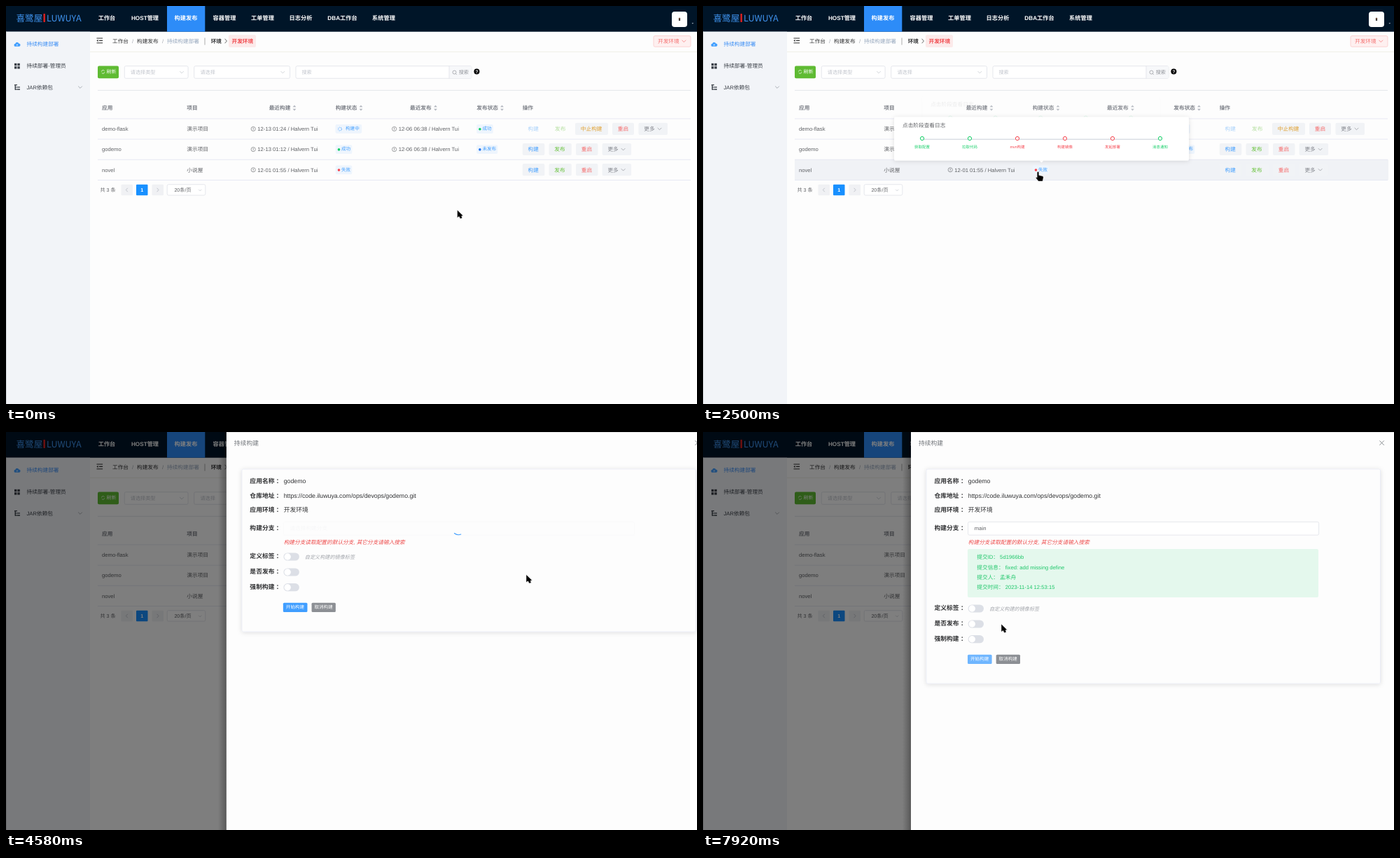
An HTML page for the animation above (8000 ms loop, 987 px wide and 568 px high).

```html
<!DOCTYPE html>
<html lang="zh-CN">
<head>
<meta charset="utf-8">
<title>持续构建部署</title>
<style>
html, body { margin: 0; width: 100%; height: 100%; overflow: hidden; background: #fdfdfd; }
svg { display: block; width: 987px; height: 568px; }
text { font-family: "Liberation Sans", "Noto Sans CJK SC", "Noto Sans CJK", sans-serif; white-space: pre; text-rendering: geometricPrecision; }
.b { font-weight: bold; }
.i { font-style: italic; }
.m { text-anchor: middle; }
.logo { font-family: "Noto Sans CJK SC", "Noto Sans CJK", sans-serif; font-weight: 300; }
</style>
</head>
<body>
<svg id="stage" viewBox="0 0 987 568"></svg>
<script>
const BLUE = '#409eff', GREEN = '#67c23a', RED = '#f56c6c', GREY = '#606266';
const LINE = '#e2e5f1', PALE = '#f1f3f6', HINT = '#c0c4cc', OK = '#13ce66', BAD = '#f5454f';

// Text is placed by its left edge (or middle) and its vertical centre.
const text = (x, y, s, fill, size = 7.68, cls = '') =>
  `<text x="${x}" y="${y + size * .36}" font-size="${size}" fill="${fill}" class="${cls}">${s}</text>`;
const rect = (x, y, w, h, fill, more = '') =>
  `<rect x="${x}" y="${y}" width="${w}" height="${h}" fill="${fill}" ${more}/>`;
const path = (d, stroke, w = .8, fill = 'none') =>
  `<path d="${d}" stroke="${stroke}" stroke-width="${w}" fill="${fill}"/>`;
const dot = (x, y, r, fill, more = '') => `<circle cx="${x}" cy="${y}" r="${r}" fill="${fill}" ${more}/>`;
const group = (id, body, more = '') => `<g id="${id}" ${more}>${body}</g>`;
const hline = (x1, x2, y, c = LINE, w = .8) => path(`M${x1} ${y}H${x2}`, c, w);
const down = (x, y, c) => path(`M${x - 2.8} ${y - 1.3}l2.8 2.8l2.8 -2.8`, c, .7);
const box = (x, y, w, h) => rect(x, y, w, h, '#fff', 'rx="2" stroke="#dcdfe6" stroke-width=".7"');

function topBar() {
  const items = [['工作台', 144], ['HOST管理', 198.5], ['构建发布', 257], ['容器管理', 312],
    ['工单管理', 366.5], ['日志分析', 421], ['DBA工作台', 480.5], ['系统管理', 539.5]];
  return rect(0, 0, 987, 36.7, '#001528') + rect(230, 0, 54.3, 36.7, '#2d8cf8') +
    text(14.5, 17.2, '喜鹭屋', '#3f93ee', 12.6, 'logo') + rect(53.5, 11, 2.4, 12, '#e02020') +
    text(58, 17.2, 'LUWUYA', '#3f93ee', 12.6, 'logo') +
    items.map(([s, x]) => text(x, 17, s, '#fff', 8.2, 'b m')).join('') +
    rect(951, 8, 22, 22, '#fff', 'rx="4"') + dot(962, 18, 1.3, '#6b4a3a') + rect(960.9, 19, 2.2, 2, '#333') +
    path('M979.5 24h2.6l-1.3 1.8z', 'none', 0, '#9aa5b1');
}

function sideBar() {
  const d = '#3a3f47';
  const cells = [[12, 81.8], [16.4, 81.8], [12, 86.2], [16.4, 86.2]];
  return rect(0, 36.7, 120, 532, '#f2f4f8') + path('M.4 36.7V568', '#c4c8cc', .8) +
    path('M13.6 57.8a2 2 0 0 1 -.2 -4a2.6 2.6 0 0 1 4.9 -.4a2.2 2.2 0 0 1 .1 4.4z', 'none', 0, BLUE) +
    path('M15.9 57.2v-2.6m-1.1 1.1l1.1 -1.1l1.1 1.1', '#fff', .6) +
    text(29.5, 54.5, '持续构建部署', '#3d8ff5') +
    cells.map(([x, y]) => rect(x, y, 3.4, 3.4, d)).join('') +
    text(29.5, 85.5, '持续部署-管理员', d) +
    path('M12 112.6h4M13.2 112.6v6.4h2.4M13.2 115.8h2.4M16 115.8h4M16 119h4', d, 1.3) +
    text(29.5, 116, 'JAR依赖包', d) + down(106, 115.8, '#8a9099');
}

function crumbs() {
  return path('M129.5 46h8.6M133 49.4h5.1M129.5 52.8h8.6', '#333', 1.1) +
    path('M131.6 47.8v3.2l-2.2 -1.6z', 'none', 0, '#333') +
    text(152, 50, '工作台', '#303133') + text(180, 50, '/', '#a0a4ac') +
    text(187, 50, '构建发布', '#303133') + text(223, 50, '/', '#a0a4ac') +
    text(230, 50, '持续构建部署', '#97a8be') + path('M284 45.5v10', '#888', .7) +
    text(292.7, 50, '环境', '#303133', 7.68, 'b') + path('M312.6 46.8l2.8 3.2l-2.8 3.2', '#444', .8) +
    rect(318, 41.3, 39, 17.7, '#fceaea', 'rx="2"') + text(322.5, 50, '开发环境', '#f0484c', 7.68, 'b') +
    rect(925, 42.6, 53, 15.6, '#fef0f0', 'rx="2" stroke="#fbc4c4" stroke-width=".7"') +
    text(931, 50.3, '开发环境', RED) + down(968.3, 50, RED) + hline(120, 987, 65.4, '#ecece4');
}

function filters() {
  return rect(131, 85.5, 30, 17.8, '#5fbb33', 'rx="2"') +
    path('M136.4 93.6a2.3 2.3 0 0 1 4.2 -1M140.9 94.3a2.3 2.3 0 0 1 -4.2 1', '#fff', .7) +
    text(143.5, 93.6, '刷新', '#fff', 6.9) +
    box(169.3, 85.7, 90.8, 17.6) + text(177.8, 94.6, '请选择类型', HINT, 7.13) + down(251, 94.4, HINT) +
    box(268.7, 85.7, 136.8, 17.6) + text(277.5, 94.6, '请选择', HINT, 7.13) + down(395.3, 94.4, HINT) +
    box(414, 85.7, 251, 17.6) + text(422.5, 94.6, '搜索', HINT, 7.13) +
    rect(633, 86, 31.7, 17, '#f7f8fa') + path('M633 85.7v17.6', '#dcdfe6', .7) +
    dot(640.5, 94.6, 2.5, 'none', 'stroke="#909399" stroke-width=".7"') + path('M642.3 96.5l1.6 1.6', '#909399', .7) +
    text(646.7, 94.6, '搜索', '#909399', 7.13) +
    dot(672.4, 93.6, 4, '#000') + text(672.4, 93.7, '?', '#fff', 6.5, 'b m') + hline(131, 978, 120.4, '#dfe1e8');
}

function tag(x, y, s, color) {
  const w = 10.4 + s.length * 6.58;
  return rect(x, y - 6.3, w, 12.8, '#eef5fd', 'rx="2"') + dot(x + 4.7, y + .3, 1.8, color) + text(x + 8.2, y - .5, s, BLUE, 6.58);
}
const button = (x, w, y, s, c, bg = PALE) => rect(x, y - 8.7, w, 17.2, bg, 'rx="2"') + text(x + 7.8, y, s, c);
const more = (x, y) => button(x, 41.5, y, '更多', '#85888f') + down(x + 30, y - .2, '#909399');
const stamp = (x, y, s) => dot(x, y, 3.1, 'none', `stroke="${GREY}" stroke-width=".6"`) +
  path(`M${x} ${y - 1.8}v2.2M${x} ${y + 1}v.8`, GREY, .7) + text(x + 6.1, y, s + ' / Halvern Tui', GREY);

function table() {
  const head = [['应用', 137], ['项目', 258.3], ['最近构建', 375.7, 412], ['构建状态', 470.7, 507],
    ['最近发布', 577, 613.5], ['发布状态', 672.3, 708.5], ['操作', 737.7]];
  const rows = [['demo-flask', '演示项目', '12-13 01:24', '12-06 06:38'],
    ['godemo', '演示项目', '12-13 01:12', '12-06 06:38'], ['novel', '小说屋', '12-01 01:55']];
  let out = rect(131, 161, 848, 29, '#f0f2f6', 'id="hover"');
  for (const [s, x, sort] of head) {
    out += text(x, 145.3, s, '#7d8088', 7.68, 'b');
    if (sort) out += path(`M${sort - 2.4} 144.3l2.4 -2.8l2.4 2.8zM${sort - 2.4} 146.8l2.4 2.8l2.4 -2.8z`, 'none', 0, '#b4b8c0');
  }
  for (let i = 0; i < 4; i++) out += hline(131, 978, 160.9 + i * 29.2);
  rows.forEach(([app, project, built, released], i) => {
    const y = 175.4 + i * 29.2;
    out += text(137, y, app, GREY) + text(258.3, y, project, GREY) + stamp(353.2, y, built);
    if (released) out += stamp(554.6, y, released);
    if (i) out += button(737.8, 31.5, y, '构建', BLUE) + button(775.5, 32.3, y, '发布', GREEN) +
      button(814, 31.5, y, '重启', RED) + more(851.6, y);
    else out += text(745.6, y, '构建', '#a9d2fb') + text(784, y, '发布', '#b5dfa0') +
      button(813, 47, y, '中止构建', '#e0a030') + button(866, 31, y, '重启', RED) + more(903.5, y);
  });
  return out + rect(470.5, 169, 37.7, 12.8, '#eef5fd', 'rx="2"') +
    dot(477, 175.6, 2.4, 'none', `id="busy" stroke="${BLUE}" stroke-width="1.1" stroke-dasharray=".7 1.185"`) +
    text(485, 174.9, '构建中', BLUE, 6.58) +
    tag(470.8, 204.6, '成功', OK) + tag(470.8, 233.8, '失败', BAD) +
    tag(672.2, 175.4, '成功', OK) + tag(672.2, 204.6, '未发布', '#2878f0');
}

function pager() {
  return text(134.5, 262.7, '共 3 条', GREY, 7.13) +
    rect(164.5, 254.7, 16.5, 15.6, '#f0f1f4', 'rx="1"') + path('M173.8 259.8l-2.5 2.7l2.5 2.7', '#b4b8c0', .8) +
    rect(186, 254.7, 16.5, 15.6, '#1890ff', 'rx="1"') + text(194.3, 262.7, '1', '#fff', 7.13, 'b m') +
    rect(208.5, 254.7, 16.5, 15.6, '#f0f1f4', 'rx="1"') + path('M215.6 259.8l2.5 2.7l-2.5 2.7', '#b4b8c0', .8) +
    box(230.2, 254.7, 54.6, 15.4) + text(240.4, 262.9, '20条/页', GREY, 7.13) +
    path('M275.2 261.8l2 2l2 -2', HINT, .7);
}

function popover(id, mid, bottom, w, h, stages = []) {
  const x = mid - w / 2, y = bottom - h, step = (w - 81) / (stages.length - 1);
  let out = rect(x, y, w, h, '#fff', 'rx="2" filter="url(#soft)"') +
    path(`M${mid - 3} ${bottom}l3 3l3 -3z`, 'none', 0, '#fff') + text(x + 12, y + 11.5, '点击阶段查看日志', GREY);
  if (stages.length) out += hline(x + 40, x + w - 41, y + 31.7, '#c3c9d4', .9);
  stages.forEach(([s, c], i) => {
    const sx = x + 40 + i * step;
    out += dot(sx, y + 30.5, 2.6, '#fff', `stroke="${c}" stroke-width="1"`) + text(sx, y + 42.8, s, c, 5.45, 'm');
  });
  return group(id, out);
}

function popovers() {
  const names = ['获取配置', '拉取代码', '构建镜像', '发起部署', '消息通知'];
  const paint = colors => names.map((s, i) => [s, colors[i]]);
  const failed = [['获取配置', OK], ['拉取代码', OK], ['mvn构建', BAD], ['构建镜像', BAD], ['发起部署', BAD], ['消息通知', OK]];
  return popover('pop0', 489.5, 161, 339, 39.5) +
    popover('pop1', 489.5, 161, 339, 62, paint([OK, OK, BLUE, '#b0b4bc', '#b0b4bc'])) +
    popover('pop2', 482.7, 191, 339, 62, paint([OK, OK, OK, OK, OK])) +
    popover('pop3', 483.5, 220.5, 421, 62, failed);
}

function drawer() {
  const ink = '#303133';
  const label = (y, s) => text(330.5, y, s + ' ：', ink, 8.77, 'b');
  const toggle = y => rect(378.6, y - 5.6, 22.4, 11.2, '#dcdfe6', 'rx="5.6"') + dot(384.3, y, 4.7, '#fff');
  const commit = ['提交ID： 5d1966bb', '提交信息： fixed: add missing define', '提交人： 孟禾舟', '提交时间： 2023-11-14 12:53:15'];
  const low = label(177, '定义标签') + toggle(178) + text(409, 178, '自定义构建的镜像标签', '#a2a5ab', 7.13, 'i') +
    label(199, '是否发布') + toggle(200) + label(220.5, '强制构建') + toggle(221.7) +
    rect(378, 243.7, 34.6, 13.2, BLUE, 'id="start" rx="1.5"') + text(382, 249.8, '开始构建', '#fff', 6.58) +
    rect(418.7, 243.7, 34.3, 13.2, '#8c8f94', 'rx="1.5"') + text(422.6, 249.8, '取消构建', '#fff', 6.58);
  return rect(285, 0, 12, 568, 'url(#edge)') + rect(297, 0, 690, 568, '#fdfdfd') +
    hline(297, 987, .3, '#c8c8c8', .6) + text(308, 15.5, '持续构建', '#72767b', 8.77) +
    path('M966.4 12.4l6.4 6.4M972.8 12.4l-6.4 6.4', '#72767b', .8) +
    rect(319, 53, 648.5, 232, '#fdfdfd', 'id="card" rx="2" stroke="#e6e9f4" stroke-width=".7" filter="url(#soft)"') +
    label(69.5, '应用名称') + text(378.8, 69.5, 'godemo', ink, 8.77) +
    label(90.5, '仓库地址') + text(378.8, 90.5, 'https://code.iluwuya.com/ops/devops/godemo.git', ink, 8.77) +
    label(111.3, '应用环境') + text(378.8, 111.3, '开发环境', ink, 8.77) +
    label(137, '构建分支') + box(378.6, 128.3, 501, 18.8) +
    group('empty', text(387.5, 137.7, '请选择构建分支', HINT)) +
    text(378.8, 157, '构建分支读取配置的默认分支, 其它分支请输入搜索', '#ee4b4b', 7.68, 'i') +
    group('commit', text(387.8, 137.7, 'main', GREY) + rect(378, 167, 501, 69, '#e4f8ed', 'rx="2"') +
      commit.map((s, i) => text(391.3, 178.5 + i * 14.4, s, '#1fc76a')).join('')) +
    group('low', low) +
    group('mask', rect(378, 127.5, 502.5, 20.4, '#fdfdfd', 'opacity=".9"') +
      dot(628.5, 137.5, 9.2, 'none', `id="ring" stroke="${BLUE}" stroke-width="1.1" stroke-linecap="round" pathLength="125.6"`));
}

const pointer = path('M0 0V11.2L2.6 9.4L4.2 12.6L7.2 11.8L6.2 8.8L8.6 8.4Z', '#fff', .5, '#000');
const hand = path('M-1.3 .8a1.3 1.3 0 0 1 2.6 0V4.6l5.2 1.2q1.4 .4 1.2 2L6.6 13H.6L-3 8.6q-.6 -1.6 1.7 -.9z', '#fff', .4, '#000');

const stage = document.getElementById('stage');
stage.innerHTML = `<defs>
  <filter id="soft" x="-10%" y="-30%" width="120%" height="160%"><feDropShadow dx="0" dy="1" stdDeviation="3" flood-color="#000" flood-opacity=".13"/></filter>
  <linearGradient id="edge"><stop stop-color="#000" stop-opacity="0"/><stop offset="1" stop-color="#000" stop-opacity=".3"/></linearGradient>
  </defs>` + rect(0, 0, 987, 568, '#fdfdfd') + topBar() + sideBar() + crumbs() + filters() + table() + pager() + popovers() +
  rect(0, 0, 987, 568, '#000', 'id="dim"') + group('drawer', drawer()) +
  dot(0, 0, 7.2, '#46a9f8', 'id="ripple"') + group('cursor', group('pointer', pointer) + group('hand', hand));

const el = {};
stage.querySelectorAll('[id]').forEach(n => el[n.id] = n);
const set = (id, attrs) => { for (const k in attrs) el[id].setAttribute(k, attrs[k]); };
const show = (id, on) => set(id, { opacity: +on });
const smooth = u => u * u * (3 - 2 * u);
const linear = u => u;

// Value at time t of a list of [time, value] points.
function track(t, pts, ease = linear) {
  if (t <= pts[0][0]) return pts[0][1];
  for (let i = 1; i < pts.length; i++) {
    const [t0, a] = pts[i - 1], [t1, b] = pts[i];
    if (t < t1) return a + (b - a) * ease((t - t0) / (t1 - t0));
  }
  return pts[pts.length - 1][1];
}
const fade = (t, a, b, c, d) => track(t, [[a, 0], [b, 1], [c, 1], [d, 0]]);

const route = [[60, 644.5, 291], [680, 493.5, 174], [1680, 493, 176], [1830, 481, 208], [2180, 480, 210],
  [2340, 478.5, 237], [2950, 478.5, 237], [3250, 560, 276], [3880, 743, 203], [4850, 743, 203.5],
  [5700, 480, 232], [6250, 410, 213.5], [6850, 396, 321], [7350, 396, 321], [7920, 426, 274]];
const handTimes = [[600, 1720], [1800, 2230], [2320, 2990], [3860, 4340], [6830, 7420]];
const LOADED = 6000;

function draw(t) {
  const x = track(t, route.map(p => [p[0], p[1]]), smooth);
  const y = track(t, route.map(p => [p[0], p[2]]), smooth);
  const row = Math.floor((y - 160.9) / 29.2);
  set('hover', { y: 161 + row * 29.2, opacity: +(row >= 0 && row < 3 && t < 4500) });
  set('busy', { transform: `rotate(${t * .18} 477 175.6)` });

  const first = fade(t, 640, 900, 1920, 2200);
  show('pop0', t < 990 ? first : 0);
  show('pop1', t < 990 ? 0 : first);
  show('pop2', fade(t, 1800, 2050, 2240, 2530));
  show('pop3', fade(t, 2310, 2480, 3180, 3450));

  show('dim', track(t, [[4330, 0], [4417, .29], [4540, .5]]));
  const open = track(t, [[4340, 0], [4417, .336], [4500, .76], [4583, .974], [4660, 1]]);
  set('drawer', { transform: `translate(${690 * (1 - open)} 0)`, opacity: track(t, [[4340, 0], [4417, .52], [4500, .84], [4583, 1]]) });

  const loaded = t >= LOADED;
  show('empty', !loaded);
  show('commit', loaded);
  set('card', { height: loaded ? 306 : 232 });
  set('low', { transform: `translate(0 ${loaded ? 74 : 0})` });
  set('start', { fill: t > 6830 ? '#6fb6ff' : BLUE });

  const u = Math.max(0, t - 4350), c = u % 1500;
  const len = track(c, [[0, 1], [750, 90]], smooth);
  const off = track(c, [[0, 0], [750, -40], [1500, -120]], smooth);
  set('ring', { 'stroke-dasharray': `${len} 150`, 'stroke-dashoffset': off, transform: `rotate(${u * .18} 628.5 137.5)` });
  show('mask', track(t, [[LOADED, 1], [LOADED + 280, 0]]));

  const click = Math.max(fade(t, 4250, 4333, 4420, 4580), fade(t, 7080, 7160, 7250, 7400));
  set('ripple', { cx: x + 1, cy: y + .8, opacity: click * .9 });
  set('cursor', { transform: `translate(${x} ${y})` });
  const grab = handTimes.some(([a, b]) => t >= a && t < b);
  show('hand', grab);
  show('pointer', !grab);
}

function tick() {
  const t = performance.now() % 8000;
  draw(Math.floor((t + 4) * .012) / .012);
  requestAnimationFrame(tick);
}
tick();
</script>
</body>
</html>
```
